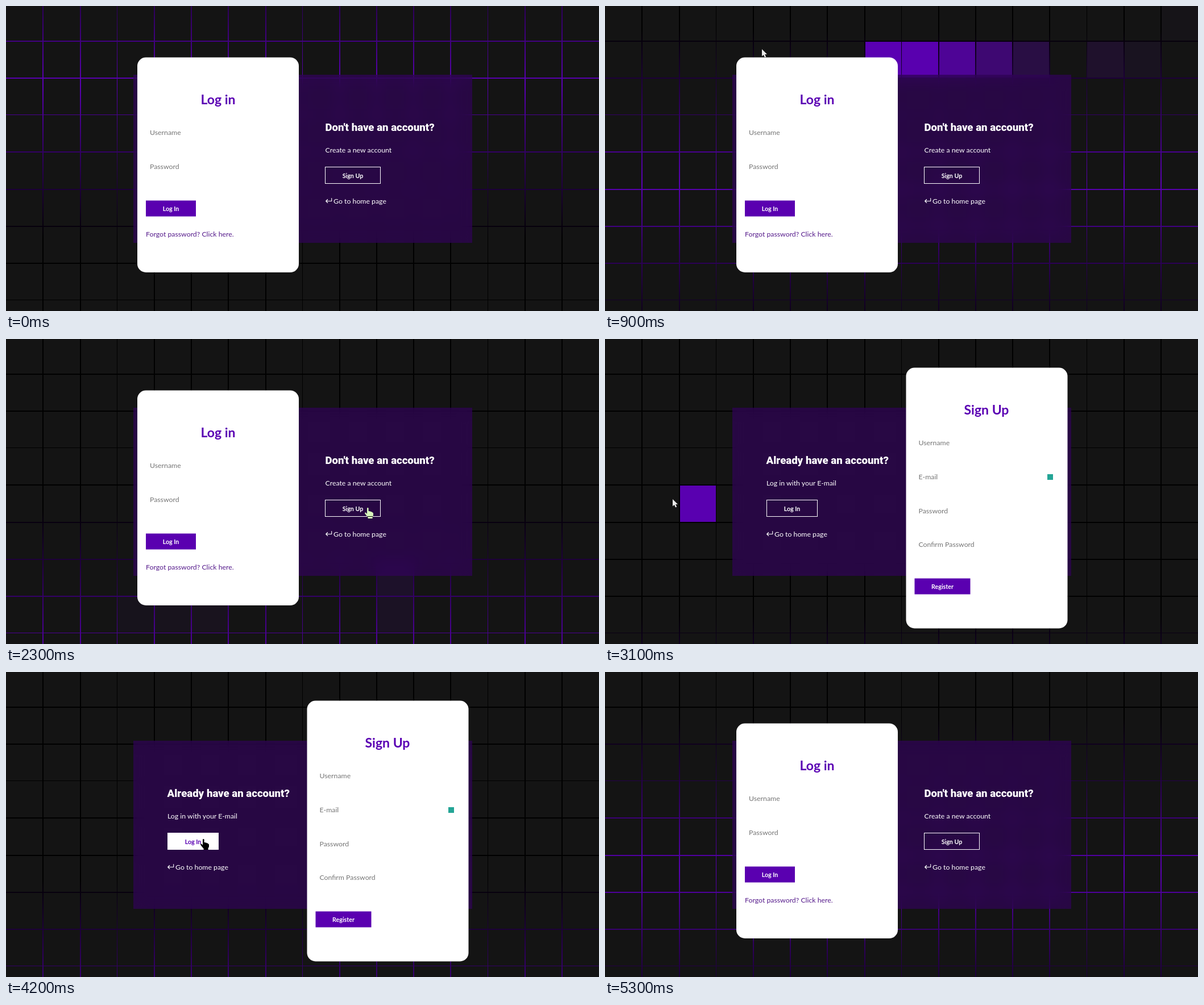
Recreate the animation shown at these times as an HTML page with a canvas. Size 1043 px wide and 537 px high, loop 5.4 s.

```html
<!DOCTYPE html>
<html lang="en">
<head>
<meta charset="utf-8">
<title>Login form</title>
<style>
  html, body { margin: 0; width: 100%; height: 100%; overflow: hidden; background: #000; }
  canvas, svg { position: absolute; left: 0; top: 0; width: 1043px; height: 537px; }
  #panel {
    position: absolute; left: 224px; top: 121px; width: 596px; height: 296px;
    background: rgba(54, 0, 100, .6); backdrop-filter: blur(12px);
  }
  text { font: 12.3px Lato, "Open Sans", sans-serif; fill: #fff; }
  .lead { font: 900 18.6px Roboto, Inter, sans-serif; }
  .title { font-size: 23px; font-weight: 700; fill: #5a00b3; text-anchor: middle; }
  .label { font-size: 10.7px; font-weight: 700; text-anchor: middle; }
  .field { fill: #757575; }
  .link { fill: #551a8b; }
  .solid { fill: #5a00b0; }
  .outline { stroke: #fff; stroke-width: 1; }
  .arrow { fill: none; stroke: #fff; stroke-width: 1.1; stroke-linecap: round; stroke-linejoin: round; }
  #pointer { mix-blend-mode: difference; fill: #fff; }
</style>
</head>
<body>
<canvas id="grid" width="1043" height="537"></canvas>
<div id="panel"></div>
<svg viewBox="0 0 1043 537">
  <g id="askSignup">
    <text class="lead" x="561.5" y="219.5">Don't have an account?</text>
    <text x="561.5" y="258">Create a new account</text>
    <rect class="outline" id="signupButton" x="561.5" y="283.5" width="97" height="29"/>
    <text class="label" id="signupLabel" x="610" y="303">Sign Up</text>
    <path class="arrow" d="M572.7 338.5v5h-10M565.7 340.5l-3 3 3 3"/>
    <text x="576" y="347.5">Go to home page</text>
  </g>
  <g id="askLogin">
    <text class="lead" x="283.5" y="219.5">Already have an account?</text>
    <text x="284" y="258">Log in with your E-mail</text>
    <rect class="outline" id="loginButton" x="284.5" y="283.5" width="89" height="29"/>
    <text class="label" id="loginLabel" x="329" y="303">Log In</text>
    <path class="arrow" d="M294.7 338.5v5h-10M287.7 340.5l-3 3 3 3"/>
    <text x="298" y="347.5">Go to home page</text>
  </g>
  <g id="card">
    <rect id="sheet" width="284" rx="15" fill="#fff"/>
    <g id="loginForm">
      <text class="title" x="142" y="82">Log in</text>
      <text class="field" x="22" y="136.5">Username</text>
      <text class="field" x="22" y="196.5">Password</text>
      <rect class="solid" x="15" y="252" width="88" height="28"/>
      <text class="label" x="59" y="270">Log In</text>
      <text class="link" x="15" y="315.5">Forgot password? Click here.</text>
    </g>
    <g id="signupForm">
      <text class="title" x="141.5" y="82">Sign Up</text>
      <text class="field" x="22" y="136.5">Username</text>
      <text class="field" x="22" y="196.5">E-mail</text>
      <rect x="248.5" y="187.5" width="10" height="10" fill="#24a596"/>
      <text class="field" x="22" y="256">Password</text>
      <text class="field" x="22" y="315.5">Confirm Password</text>
      <rect class="solid" x="15" y="371" width="98" height="28"/>
      <text class="label" x="64" y="389">Register</text>
    </g>
  </g>
</svg>
<svg id="pointer" viewBox="0 0 1043 537">
  <path id="arrowPointer" d="M0 0V12.5L2.9 9.9L5 14.6L7.2 13.6L5.1 9.1H9Z"/>
  <path id="handPointer" d="M3 1.2Q3 0 4.3 0T5.6 1.2V6Q7.6 5.6 8 6.6Q9.8 6.2 10.3 7.4Q12 7 12.4 8.4Q14 8.2 14 10V13.5L12.6 16.5V19H4.6V17L1.2 13L-1 9.8Q-.8 8.4 .6 8.6L3 10.8Z"/>
</svg>
<script>
const LOOP = 5400, STEP = 100;
const W = 1043, H = 537, CELL = W / 16;
const FADE = 900, SLIDE = 700, OVERSHOOT = 25;
const TO_SIGNUP = 2330, TO_LOGIN = 4220;

const $ = id => document.getElementById(id);
const ctx = $('grid').getContext('2d');
const clamp = v => Math.max(0, Math.min(1, v));
const mix = (a, b, p) => a + (b - a) * p;

// The CSS "ease" curve: cubic-bezier(.25, .1, .25, 1)
function ease(x) {
  if (x <= 0 || x >= 1) return clamp(x);
  const bez = (a, b, s) => 3 * a * s * (1 - s) ** 2 + 3 * b * s * s * (1 - s) + s ** 3;
  let lo = 0, hi = 1;
  for (let i = 0; i < 20; i++) {
    const mid = (lo + hi) / 2;
    if (bez(.25, .25, mid) < x) lo = mid; else hi = mid;
  }
  return bez(.1, 1, lo);
}

// Interpolates [time, ...values] key points
function along(points, t) {
  const i = points.findIndex(p => p[0] > t);
  if (i === 0) return points[0].slice(1);
  if (i < 0) return points[points.length - 1].slice(1);
  const a = points[i - 1], b = points[i], p = (t - a[0]) / (b[0] - a[0]);
  return a.slice(1).map((v, k) => mix(v, b[k + 1], p));
}

// Top edge of the glow behind the tiles
const glowPath = [[0, -130], [900, 43], [1700, 180], [2300, 300], [3100, 487],
  [3400, 537], [4200, 367], [5300, 82]];

const pointerPath = [[100, 1015, 25], [290, 930, 85], [405, 820, 92], [530, 700, 90],
  [675, 590, 86], [765, 470, 80], [900, 276, 76], [1030, 110, 150], [1286, 150, 290],
  [1385, 170, 350], [1475, 225, 430], [1600, 420, 475], [1700, 670, 461], [1800, 690, 420],
  [2000, 650, 315], [2300, 632, 297], [2450, 625, 296], [3100, 119, 282], [3600, 160, 275],
  [3900, 280, 176], [4100, 338, 285], [4200, 343, 294], [4400, 343, 294], [4900, 560, 560]];

// Tiles touched by the pointer: [column, row, time it was left]
const trail = [[15, 0, 180], [14, 1, 290], [13, 1, 405], [11, 1, 530], [10, 1, 675],
  [9, 1, 765], [8, 1, 870], [7, 1, 895], [2, 1, 980], [1, 2, 1040], [2, 4, 1286],
  [2, 5, 1385], [3, 6, 1475], [3, 7, 1640], [4, 7, 1660], [5, 7, 1680],
  [10, 7, 1740], [10, 6, 1790], [2, 4, 3080]];

// Gap k between tiles; one gap in five rounds down to a single pixel
function gap(k, offset, thin) {
  const start = Math.round(offset + CELL * k - .8);
  return [start, start + (k % 5 === thin ? 1 : 2)];
}
const column = c => [c ? gap(c, 0, 3)[1] : 0, c < 15 ? gap(c + 1, 0, 3)[0] : W];
const row = r => [r ? gap(r - 1, 61.6, 2)[1] : 0, r < 8 ? gap(r, 61.6, 2)[0] : H];

function fillTile(c, r) {
  const [x0, x1] = column(c), [y0, y1] = row(r);
  ctx.fillRect(x0, y0, x1 - x0, y1 - y0);
}

function drawGrid(t) {
  const [top] = along(glowPath, t);
  const glow = ctx.createLinearGradient(0, top, 0, top + H);
  glow.addColorStop(0, '#000');
  glow.addColorStop(.5, '#5b00b5');
  glow.addColorStop(1, '#000');
  ctx.fillStyle = glow;
  ctx.fillRect(0, 0, W, H);

  ctx.fillStyle = '#141414';
  for (let c = 0; c < 16; c++) for (let r = 0; r < 9; r++) fillTile(c, r);

  ctx.fillStyle = '#5b00b3';
  for (const [c, r, left] of trail) {
    const age = t - left;
    if (age < 0 || age > FADE) continue;
    ctx.globalAlpha = 1 - ease(age / FADE);
    fillTile(c, r);
  }
  ctx.globalAlpha = 1;
}

// Slides past the end by OVERSHOOT, then settles
function slide(from, to, p) {
  const beyond = to + Math.sign(to - from) * OVERSHOOT;
  return p < .5 ? mix(from, beyond, ease(p * 2)) : mix(beyond, to, ease(p * 2 - 1));
}

function drawCard(t) {
  const signup = t >= TO_SIGNUP && t < TO_LOGIN;
  const x = t < TO_LOGIN
    ? slide(231, 529.5, clamp((t - TO_SIGNUP) / SLIDE))
    : slide(529.5, 231, clamp((t - TO_LOGIN) / SLIDE));
  $('card').setAttribute('transform', `translate(${x} ${signup ? 50.5 : 90.5})`);
  $('sheet').setAttribute('height', signup ? 459 : 378.5);

  const shown = ms => ease(clamp((t - TO_SIGNUP) / ms)) - ease(clamp((t - TO_LOGIN) / ms));
  $('signupForm').style.opacity = shown(400);
  $('loginForm').style.opacity = 1 - shown(400);
  $('askLogin').style.opacity = shown(300);
  $('askSignup').style.opacity = 1 - shown(300);
}

function drawButton(name, hover) {
  $(name + 'Button').style.fill = `rgba(255,255,255,${hover})`;
  $(name + 'Label').style.fill = `rgb(${mix(255, 90, hover)},${mix(255, 0, hover)},${mix(255, 179, hover)})`;
}

function drawPointer(t) {
  const [x, y] = along(pointerPath, t);
  const hand = (t >= 2100 && t <= 2400) || (t >= 4100 && t <= 4400);
  $('pointer').style.display = t >= 100 && t < 4900 ? '' : 'none';
  $('arrowPointer').style.display = hand ? 'none' : '';
  $('handPointer').style.display = hand ? '' : 'none';
  for (const id of ['arrowPointer', 'handPointer']) {
    $(id).setAttribute('transform', `translate(${x} ${y})`);
  }
}

function draw(now) {
  const t = Math.floor((now % LOOP) / STEP) * STEP;
  drawGrid(t);
  drawCard(t);
  drawButton('signup', t >= 2400 && t < 2700 ? 1 : 0);
  drawButton('login', t >= 4100 && t < 4600 ? 1 : 0);
  drawPointer(t);
}

const start = performance.now();
function tick() {
  draw(performance.now() - start);
  requestAnimationFrame(tick);
}
tick();
</script>
</body>
</html>
```
